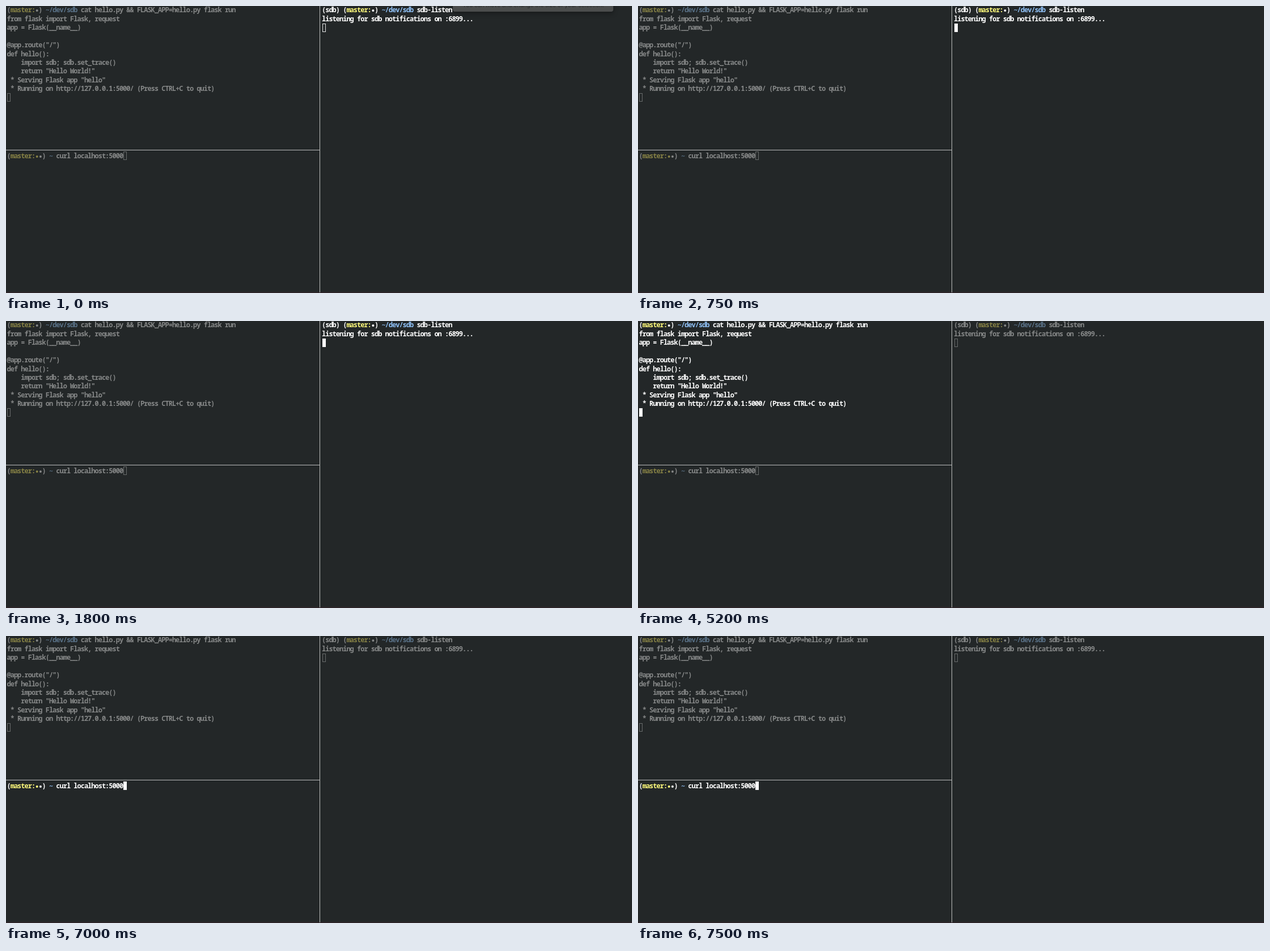
Recreate the animation shown at these times as an HTML page with a canvas. Size 1104 by 507 pixels, loop 8000 ms.

```html
<!DOCTYPE html>
<html lang="en">
<head>
<meta charset="utf-8">
<title>Terminal panes</title>
<style>
  html, body { margin: 0; width: 100%; height: 100%; overflow: hidden; background: #232728; }
  canvas { display: block; width: 1104px; height: 507px; }
</style>
</head>
<body>
<canvas id="stage" width="1104" height="507"></canvas>
<script>
const ctx = document.getElementById("stage").getContext("2d");
const LOOP = 8000, CELL = 6.2, ROW = 15.44;
const BRIGHT = { w: "#ffffff", y: "#fffb7c", b: "#92c4fa", box: "#e4e5e5" };
const DIM = { w: "#858787", y: "#858045", b: "#5a7288", box: "#686b6b" };

// A line is plain text or a list of [colour key, text] runs.
const panes = [
  {
    x: 2, top: 0, cursor: [2, 154],
    lines: [
      [["w", "("], ["y", "master:"], ["w", "•) "], ["b", "~/dev/sdb"],
       ["w", " cat hello.py && FLASK_APP=hello.py flask run"]],
      "from flask import Flask, request",
      "app = Flask(__name__)",
      "",
      "@app.route(\"/\")",
      "def hello():",
      "    import sdb; sdb.set_trace()",
      "    return \"Hello World!\"",
      " * Serving Flask app \"hello\"",
      " * Running on http://127.0.0.1:5000/ (Press CTRL+C to quit)"
    ]
  },
  {
    x: 2, top: 257.5, cursor: [207, 257],
    lines: [
      [["w", "("], ["y", "master:•"], ["w", "•) "], ["b", "~"], ["w", " curl localhost:5000"]]
    ]
  },
  {
    x: 557.5, top: 0, cursor: [558, 31],
    lines: [
      [["w", "(sdb) ("], ["y", "master:"], ["w", "•) "], ["b", "~/dev/sdb"], ["w", " sdb-listen"]],
      "listening for sdb notifications on :6899..."
    ]
  }
];

function drawLine(line, x, y, colors) {
  const runs = typeof line === "string" ? [["w", line]] : line;
  let column = 0;
  for (const [key, text] of runs) {
    ctx.fillStyle = colors[key];
    for (const char of text) {
      const center = x + (column++ + 0.5) * CELL;
      if (char === "•") {
        ctx.beginPath();
        ctx.arc(center, y - 3, 2, 0, Math.PI * 2);
        ctx.fill();
      } else if (char !== " ") {
        ctx.fillText(char, center, y);
      }
    }
  }
}

function drawPane(pane, active, solidCursor) {
  const colors = active ? BRIGHT : DIM;
  ctx.font = '600 12px "Noto Sans Mono", monospace';
  ctx.textAlign = "center";
  pane.lines.forEach((line, i) =>
    drawLine(line, pane.x, Math.round(pane.top + 11.4 + i * ROW), colors));

  const [x, y] = pane.cursor;
  ctx.fillStyle = colors.w;
  ctx.strokeStyle = colors.box;
  if (solidCursor) ctx.fillRect(x, y, 6, 15);
  else ctx.strokeRect(x + 0.5, y + 0.5, 5, 14);
}

function drawTooltip() {
  ctx.save();
  ctx.shadowColor = "rgba(0, 0, 0, 0.35)";
  ctx.shadowBlur = 8;
  ctx.shadowOffsetY = 3;
  ctx.fillStyle = "#4b4d4d";
  ctx.beginPath();
  ctx.roundRect(788, -20, 283, 30, 4);
  ctx.fill();
  ctx.restore();
  ctx.font = "10px Inter, sans-serif";
  ctx.textAlign = "center";
  ctx.fillStyle = "#292c2d";
  ctx.fillText("You can move and change the size of your selection.", 930, 2);
}

function draw(t) {
  ctx.fillStyle = "#232728";
  ctx.fillRect(0, 0, 1104, 507);
  ctx.fillStyle = "#2d2529";
  ctx.fillRect(0, 505, 1104, 2);
  ctx.fillStyle = "#bcbebe";
  ctx.fillRect(553, 0, 1, 506);
  ctx.fillRect(0, 254, 553, 1);

  const focus = t < 2500 ? 2 : t < 7000 ? 0 : 1;
  if (t < 250) drawTooltip();
  panes.forEach((pane, i) => drawPane(pane, i === focus, i === focus && t >= 750));
}

function tick() {
  draw(performance.now() % LOOP);
  requestAnimationFrame(tick);
}
tick();
</script>
</body>
</html>
```
